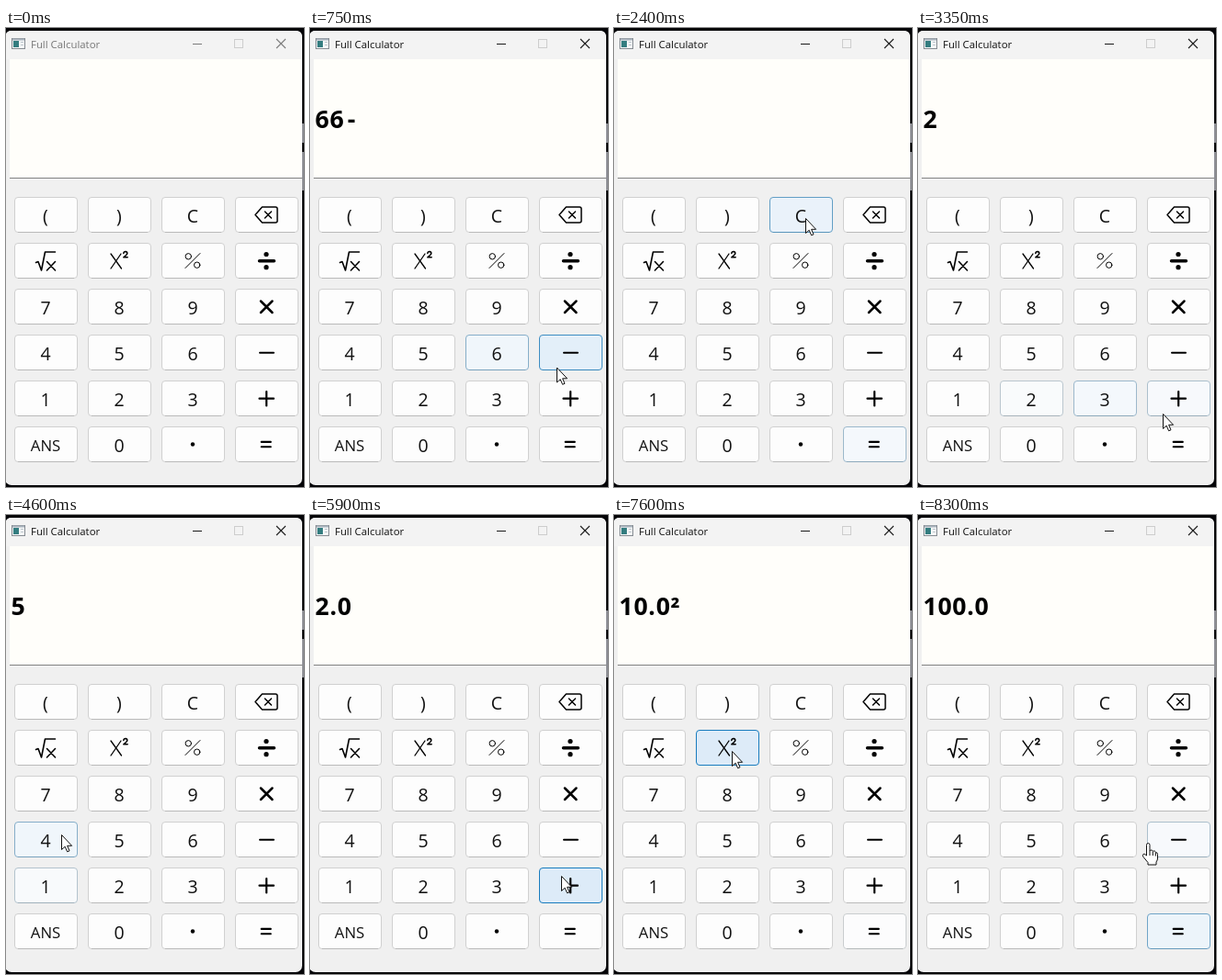
Animation, 324 px wide and 500 px high, one loop 8.35 s. Source, as an HTML page:

```html
<!DOCTYPE html>
<html lang="en">
<head>
<meta charset="utf-8">
<title>Full Calculator</title>
<style>
html, body { margin: 0; width: 100%; height: 100%; overflow: hidden; background: #000; }
svg { display: block; width: 324px; height: 500px; }
text { font-family: "Open Sans", "Noto Sans", sans-serif; fill: #111; }
.title { font-size: 11.4px; }
.display { font-size: 26.7px; font-weight: 700; letter-spacing: .7px; fill: #000; }
.label { font-size: 19.5px; text-anchor: middle; }
.small { font-size: 16.8px; }
.line { fill: none; stroke: #000; stroke-linecap: round; stroke-linejoin: round; }
</style>
</head>
<body>
<svg viewBox="0 0 324 500">
  <rect width="324" height="500" fill="#050508"/>
  <path d="M323 104V125M323 135V177" stroke="#8c8d93" stroke-width="2"/>
  <rect x="-1" y="3" width="323" height="495" rx="7" fill="#f0f0f0"/>
  <path d="M0 34V7Q1 3 6 3H315Q322 3 322 10V34Z" fill="#f3f3f3"/>
  <g>
    <rect x="6.5" y="11.5" width="14" height="11" fill="#f4f6f7" stroke="#858b91"/>
    <path d="M7 12.5H20" stroke="#a9b3bd" stroke-width="2"/>
    <rect x="8" y="14" width="6" height="7" fill="#347d80"/>
    <path d="M16 15.5H19M16 18.5H19" stroke="#bcc5cc"/>
  </g>
  <g id="bar">
    <text class="title" x="27" y="22">Full Calculator</text>
    <path d="M203 17.5H213M294 12L304 22M304 12L294 22" fill="none" stroke="#1a1a1a" stroke-width="1.1"/>
  </g>
  <rect x="248.5" y="12.5" width="9" height="9" fill="none" stroke="#cdcdcd"/>
  <rect x="4" y="34" width="318" height="129" fill="#fffefa"/>
  <path d="M4 163.5H322" stroke="#828282"/>
  <text id="display" class="display" x="5.5" y="108.5"></text>
  <g id="keys"></g>
  <path id="arrow" d="M.5 .5V16.5L4.2 13.2L6.6 18.8L9 17.8L6.6 12.3H11.6Z" fill="#fff" stroke="#111" stroke-linejoin="round"/>
  <path id="hand" d="M-1.5 13V1.5Q-1.5 -.5 .3 -.5Q2 -.5 2 1.5V8Q2.5 6.8 3.9 7Q5.2 7.2 5.3 8.5Q6 7.6 7.2 8Q8.3 8.4 8.3 9.6Q10.5 9.3 10.5 11.5V16Q10.5 18 9 20V23H0V20.5L-5 14.5Q-6.3 12.4 -5 11.4Q-3.6 10.6 -1.5 13ZM2 8V13M5.3 9V13M8.3 10V13.5" fill="#fff" stroke="#111" stroke-linejoin="round"/>
</svg>
<script>
const LOOP = 8350, STEP = 50, TRAVEL = 200, PRESS = 250;
const $ = id => document.getElementById(id);

// Icons are drawn around the middle of their key.
const line = (d, w) => `<path class="line" d="${d}" stroke-width="${w}"/>`;
const dot = (y, r) => `<circle cy="${y}" r="${r}"/>`;
const ring = c => `<circle class="line" cx="${c}" cy="${c}" r="3.2"/>`;
const label = (s, cls = '') => `<text class="label ${cls}" y="${cls ? 7.5 : 8.5}">${s}</text>`;
const icons = {
  back: line('M-4.5 -8.5H10Q12 -8.5 12 -6.5V6.5Q12 8.5 10 8.5H-4.5L-12 0ZM-1.5 -3.5L5.5 3.5M5.5 -3.5L-1.5 3.5', 1.5),
  root: line('M-10.5 2L-8 1L-4.5 10.5L-.5 -9.5H10.5M1.5 1L10.5 10.5M10.5 1L1.5 10.5', 1.6),
  square: line('M-9 -7.5L2.5 8.5M2 -7.5L-9 8.5', 1.3) + line('M4.8 -8Q5 -10 7 -10Q9 -9.8 8.8 -7.8Q8.5 -6.4 4.8 -3.7H9.2', 1.5),
  percent: line('M8 -8L-8 8', 1) + ring(-4.7) + ring(4.7),
  divide: line('M-7.5 .3H8.5', 3.4) + dot(-7, 2.6) + dot(7.2, 2.6),
  times: line('M-6 -6L6.5 6.5M6.5 -6L-6 6.5', 2.5),
  minus: line('M-7 .2H8', 2),
  plus: line('M-7.5 .2H8M.2 -7.5V8', 2.2),
  point: dot(0, 2.2),
  equals: line('M-5.3 -2.6H4.8M-5.3 2.8H4.8', 2.1),
  ANS: label('ANS', 'small')
};
const names = '( ) C back root square percent divide 7 8 9 times 4 5 6 minus 1 2 3 plus ANS 0 point equals'.split(' ');
const keys = names.map((name, i) => ({ name, x: 9 + i % 4 * 80, y: 184 + (i >> 2) * 50 }));

$('keys').innerHTML = keys.map(({ name, x, y }) =>
  `<g><rect x="${x + .5}" y="${y + .5}" width="68" height="38" rx="3.5"/>
  <path d="M${x + 4} ${y + 38.5}H${x + 65}"/>
  <g transform="translate(${x + 34} ${y + 19.5})">${icons[name] || label(name)}</g></g>`).join('');
const faces = [...$('keys').children].map(g => [g.children[0], g.children[1]]);

// Departure time and key; a stop with an offset is passed without a press.
const stops = [
  [50, '6'], [200, '6'], [450, 'minus'], [700, '3'], [950, 'equals', 6, 5], [1250, 'equals'],
  [2100, 'C'], [2850, '2'], [3150, 'plus', -17, 17], [3350, 'plus'], [3600, '3'], [3850, 'equals'],
  [4100, 'ANS', 20, -25], [4400, '4', 17, -5], [4600, 'root'], [4850, '4'], [5150, 'equals'],
  [5450, 'plus', -10, -10], [5900, 'plus'], [6150, '8'], [6450, 'equals', -4, -22], [6950, 'equals'],
  [7200, 'square'], [7700, 'equals'], [8100, 'minus', -33, 5]
].map(([start, name, dx, dy]) => {
  const { x, y } = keys.find(k => k.name === name);
  return { start, name, x: x + 34 + (dx ?? 5), y: y + 19 + (dy ?? 4), press: dx === undefined };
});

function pointer(t) {
  let x = 330, y = 372;
  for (const s of stops) {
    const k = Math.max(0, Math.min(1, (t - s.start) / TRAVEL));
    x += (s.x - x) * k;
    y += (s.y - y) * k;
  }
  return [x, y];
}

// The calculator itself: roots and squares give decimals.
const symbols = { minus: '-', plus: '+', root: '√', square: '²' };
function term(s) {
  const n = parseFloat(s.replace('√', ''));
  return s.includes('√') ? Math.sqrt(n) : s.includes('²') ? n * n : n;
}
function solve(s) {
  const sum = s.match(/[+-]?[^+-]+/g).reduce((total, part) => total + term(part), 0);
  return /[√².]/.test(s) ? sum.toFixed(1) : String(sum);
}
function reading(t) {
  let text = '', solved = false;
  for (const { start, name, press } of stops) {
    if (!press || start + PRESS > t) continue;
    if (name === 'C') text = '';
    else if (name === 'equals') text = solve(text);
    else text = (solved && /\d|root/.test(name) ? '' : text) + (symbols[name] || name);
    solved = name === 'equals';
  }
  return text;
}

// Hover glow rises quickly and fades slowly.
const states = [];
let glow = keys.map(() => 0);
for (let t = 0; t < LOOP; t += STEP) {
  const [px, py] = pointer(t);
  glow = keys.map(({ x, y }, i) => {
    const over = px >= x && px < x + 69 && py >= y && py < y + 39;
    return Math.max(0, Math.min(1, glow[i] + (over ? .2 : -.12)));
  });
  states.push(glow);
}

const mix = (a, b, k) => `rgb(${a.map((v, i) => Math.round(v + (b[i] - v) * k))})`;
const BLUE = [24, 124, 190];

function draw(n) {
  const t = n * STEP;
  faces.forEach(([face, edge], i) => {
    const k = states[n][i];
    face.setAttribute('fill', mix([253, 253, 253], [221, 235, 248], k));
    face.setAttribute('stroke', mix([208, 208, 208], BLUE, k));
    edge.setAttribute('stroke', mix([186, 186, 186], BLUE, k));
  });
  // A hair space gives the operators room.
  $('display').textContent = reading(t).replace(/[+-]/g, '\u200a$&');
  $('bar').setAttribute('opacity', t < stops[0].start + PRESS ? .55 : 1);
  const hand = t >= LOOP - 100;
  for (const [id, on] of [['arrow', !hand], ['hand', hand]]) {
    $(id).setAttribute('transform', `translate(${pointer(t)})`);
    $(id).style.display = on ? '' : 'none';
  }
}

const start = performance.now();
let shown = -1;
function tick() {
  const n = Math.floor((performance.now() - start) % LOOP / STEP);
  if (n !== shown) draw(shown = n);
  requestAnimationFrame(tick);
}
tick();
</script>
</body>
</html>
```
